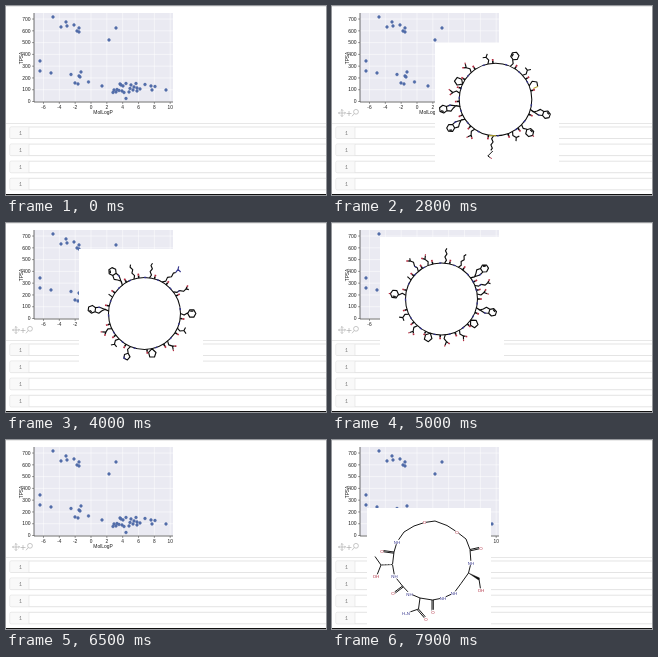
An HTML page for the animation above (8 s loop, 320x189 px).

```html
<!DOCTYPE html>
<html lang="en">
<head>
<meta charset="utf-8">
<title>Molecule scatter plot</title>
<style>
html, body { margin: 0; width: 100%; height: 100%; overflow: hidden; background: #fff; }
svg { display: block; width: 100vw; height: 100vh; font-family: "Liberation Sans", Arial, sans-serif; }
path { stroke-linejoin: round; }
</style>
</head>
<body>
<svg id="stage" viewBox="0 0 320 189"></svg>
<script>
const BLACK = '#0c0c0c', RED = '#b02c40', BLUE = '#34348c', GOLD = '#b8a830';
const stage = document.getElementById('stage');

const line = (d, color = BLACK, w = 0.95, fill = 'none') =>
  `<path d="${d}" stroke="${color}" stroke-width="${w}" fill="${fill}"/>`;
const rect = (x, y, w, h, fill, extra = '') =>
  `<rect x="${x}" y="${y}" width="${w}" height="${h}" fill="${fill}" ${extra}/>`;
const circle = (x, y, r, extra) => `<circle cx="${x}" cy="${y}" r="${r}" ${extra}/>`;
const text = (x, y, s, size, color = '#1c1c1c', anchor = 'middle', extra = '') =>
  `<text x="${x}" y="${y}" font-size="${size}" fill="${color}" text-anchor="${anchor}" ${extra}>${s}</text>`;
const group = (attr, body) => `<g ${attr}>${body}</g>`;

// ---- notebook page and plot ----
const xAt = v => 85 + v * 7.92;
const yAt = v => 95.5 - v * 0.1178;

const dots = [
  [47, 11], [60, 16], [68, 19], [55, 21], [61, 20], [73, 22], [71, 25], [73, 26], [110, 22], [103, 34],
  [34, 55], [34, 65], [45, 67], [65, 68.5], [75, 66], [73, 70], [74, 71], [69, 77], [72, 78], [82.5, 76],
  [96, 80], [107, 86.5], [108, 84], [110, 86], [111, 83.5], [114, 78], [115, 79], [113, 84.5], [117, 80],
  [116, 85], [118, 86.5], [120, 77.5], [120, 92.5], [123, 86], [124, 82.5], [125, 79], [127, 84],
  [128, 81], [130, 77.5], [131, 82], [131, 85], [134, 83], [139, 78.5], [145, 80], [146, 84], [149, 80.5], [160, 84]
];

function page() {
  let s = rect(0, 0, 320, 189, '#fff') + rect(0, 0, 320, 0.6, '#ddd');
  s += rect(28, 7, 139, 89, '#eaeaf2');
  for (let v = -6; v <= 10; v += 2) {
    const x = xAt(v);
    s += line(`M${x} 7V96`, '#fff', 0.5) + line(`M${x} 96v2`, '#444', 0.5) + text(x, 102.6, v, 4.8);
  }
  for (let v = 0; v <= 700; v += 100) {
    const y = yAt(v);
    s += line(`M28 ${y}H167`, '#fff', 0.5) + line(`M26 ${y}h2`, '#444', 0.5) + text(24.6, y + 1.7, v, 5, '#1c1c1c', 'end');
  }
  s += line('M28 7V96H167', '#333', 0.7);
  s += text(97, 107.9, 'MolLogP', 4.9);
  s += text(0, 0, 'TPSA', 4.8, '#1c1c1c', 'middle', 'transform="translate(16.7 52) rotate(-90)"');
  for (const [x, y] of dots)
    s += circle(x, y, 1.4, 'fill="#5470ac" stroke="#4a64a0" stroke-width=".4"');
  s += rect(0, 117.2, 320, 0.7, '#ddd');
  for (let i = 0; i < 4; i++) {
    const y = 121 + i * 17.1;
    s += rect(4, y, 330, 11.5, '#fff', 'rx="1" stroke="#d8d8d8" stroke-width=".7"');
    s += rect(4.4, y + 0.4, 18.6, 10.7, '#f9f9f9') + line(`M23 ${y}v11.5`, '#e0e0e0', 0.6);
    s += text(14.5, y + 7.7, '1', 5, '#777', 'middle', 'font-family="Liberation Mono, monospace"');
  }
  return s;
}

const toolbar = group('id="tools" opacity="0"',
  line('M6.5 107h7M10 103.5v7M8.8 104.7l1.2-1.2 1.2 1.2M8.8 109.3l1.2 1.2 1.2-1.2M7.7 105.8l-1.2 1.2 1.2 1.2' +
    'M12.3 105.8l1.2 1.2-1.2 1.2M14.5 107.5h5M17 105v5M26.4 105.8a2.4 2.4 0 1 0-4.8 0a2.4 2.4 0 1 0 4.8 0M22.2 107.5l-2.2 2.8',
    '#aaa', 0.65));

// ---- side chains, drawn outward along +x ----
const hex = x => `M${x} 0l1.7-3h3.4l1.7 3-1.7 3h-3.4zM${x + 2.1}-1.9h2.6M${x + 1}.5l1.1 1.8M${x + 5.8}.5l-1.1 1.8`;
const fork = 'M0 0L3 1.3L5.8-.4';
const oxygen = (x, y) => line(`M${x} ${y}l1.1-1.3`, BLACK, 1.1) + line(`M${x + 1.1} ${y - 1.3}l1-1.2`, RED, 1.3);
const chains = {
  ala: line('M0 0L4 .8'),
  leu: line(fork + 'L6-3.2M5.8-.4L8.4 1.2'),
  phe: line(fork + 'L6 0' + hex(6)),
  tyr: line(fork + 'L6 0' + hex(6)) + line('M12.8 0h1.4', RED),
  trp: line(fork + 'L8-2.4L11.2-1.4L11 2L7.7 2.6zM11.2-1.4L14.2-2.8L17 -.9L16.8 2.2L13.8 3.7L11 2M14-1.6l1.9 1.2') +
    line('M7.1 2L7.7 2.6L9 2.4', BLUE),
  lys: line('M0 0L2.6 1.3L5.2-.2L7.8 1.3L10.4-.2L12.4 .8'),
  arg: line('M0 0L3 1.4L6-.2L9 1.4L12 0L14 .8') + line('M14 .8L17 0L19-1.6M17 0L17.4 3', BLUE),
  acid: line(fork + 'L8.4 1') + oxygen(5.8, -0.4) + line('M8.4 1l1.2.6', RED),
  amide: line('M0 0L3 1.3L5.4.2M5.4.4L8.4 1.8L11 .4L13 1.6') + line('M3.8 1L5.4.4', BLUE) + oxygen(11, 0.4),
  pro: line('M0 0L3.8-2.6L7.2-.6L6.4 3.2L2.4 3.4z'),
  cys: line('M0 0L3.8-2.6L7.2-.6L6.4 3.2') + line('M6.4 3.2L2.4 3.4', GOLD),
  his: line(fork + 'L8-3L11.2-2L11 1.2L8 2L5.8-.4') + line('M11.1-.4L11 1.2L9.5 1.6', BLUE),
  tail: line('M0 0L4 2.5' + Array.from({ length: 13 }, (_, i) => `l3.9 ${i % 2 ? 2.1 : -1.7}`).join('')) +
    line('M4 2.5l-.6 3.2', RED)
};

// subs: [angle, chain, extra turn]; every chain brings its own amide bond on the ring
function ring(cx, cy, r, subs, k = 1.2) {
  let s = circle(cx, cy, r, `fill="none" stroke="${BLACK}" stroke-width="1.05"`);
  const carbonyl = line('M0 0h2', BLACK, 1.3) + line('M2 0h1.6', RED, 1.4);
  const nitrogen = line('M0-.9v1.8', BLUE, 1.1);
  const place = (a, scale, body, turn = 0) =>
    group(`transform="translate(${cx} ${cy}) rotate(${a}) translate(${r}) rotate(${turn}) scale(${scale})"`, body);
  for (const [a, type, turn] of subs)
    s += place(a, k, chains[type], turn) + place(a + 8, k, carbonyl) + place(a - 7, k, nitrogen);
  return s;
}

function labelled() {
  const atom = (x, y, s, c) => rect(x - s.length * 1.5, y - 2.2, s.length * 3, 4.4, '#fff') + text(x, y + 1.6, s, 4.4, c);
  let s = line('M92.5 82.5L103 81L115 85.5L125 92L134 99L138 109.5L139 123L136.5 133L129 143.5L122 153L111 158' +
    'L100.5 160L88 158L77.5 153.5L70.5 146L62.5 136L60.5 124.5L62 112L65 102L72 92L82 86z' +
    'M138 109.5l9-2M138.3 110.8l9-2M147 139l1.5 10M100 160v11M101.3 160v11M70.5 146l-8 6M71.3 147l-8 6' +
    'M62 112l-11-1.5M61.8 113.2l-11-1.5M60.5 124.5L49 125L45 135M49 125L43 116.5' +
    'M88 158L86.5 169L75 173M86.5 169l7 8M85.5 170l7 8');
  s += line('M136.5 133L147.6 138L146.6 140z', BLACK, 0.4, BLACK);
  s += line('M60.5 124.5L49 125', '#fff', 0.9).replace('/>', ' stroke-dasharray=".6 .9"/>');
  for (const [x, y] of [[92.5, 82.5], [125, 92], [149, 108], [50, 111], [61, 153.5], [101, 172], [94, 179]])
    s += atom(x, y, 'O', RED);
  s += atom(44, 136.5, 'OH', RED) + atom(149, 150.5, 'OH', RED) + atom(74, 173.5, 'H₂N', BLUE);
  for (const [x, y] of [[65, 102], [139, 123], [62.5, 136.5], [77.5, 154], [111, 158.5], [122, 153.5]])
    s += atom(x, y, 'NH', BLUE);
  return s;
}

// ---- hover cards: start, end, left, top, drawing ----
const cards = [
  [1800, 2300, 111, 27, ring(151, 87, 24.5, [
    [-75, 'tyr'], [-103, 'ala'], [-122, 'ala'], [-143, 'leu'], [-162, 'leu'], [188, 'phe'], [157, 'leu'], [137, 'leu'],
    [113, 'trp'], [67, 'trp'], [43, 'leu'], [21, 'leu'], [-18, 'tail', 29], [-38, 'leu'], [-54, 'ala']], 0.85)],
  [2800, 3200, 103, 37, ring(163.5, 93.5, 36.3, [
    [-102, 'leu'], [-66, 'phe'], [-132, 'acid'], [-155, 'pro'], [190, 'acid'], [169, 'trp'], [147, 'trp'], [125, 'acid'],
    [93, 'lys', 4], [62, 'leu'], [44, 'tyr'], [16, 'trp'], [-22, 'cys'], [-42, 'leu']]) +
    line('M157 129.6l7 .2', GOLD, 1.1) + line('M160.8 145l-5 5l2.4 1.6') + line('M158.2 151.6l1.6 1', RED)],
  [4000, 4500, 73, 26, ring(138.5, 90.5, 36, [
    [-128, 'trp'], [-107, 'lys'], [-82, 'lys'], [-61, 'arg', 23], [-37, 'amide', 22], [0, 'phe'], [24, 'leu'], [50, 'acid'],
    [78, 'pro'], [113, 'his'], [135, 'leu'], [155, 'acid'], [184, 'trp'], [207, 'ala']])],
  [5000, 5500, 48, 14, ring(109.5, 76, 36, [
    [-130, 'amide'], [-112, 'acid'], [-85, 'lys'], [-62, 'lys'], [-36, 'trp'], [-22, 'amide', 8], [-8, 'acid'], [14, 'trp'],
    [36, 'pro'], [60, 'acid'], [84, 'acid'], [108, 'pro'], [132, 'acid'], [155, 'leu'], [186, 'tyr'], [212, 'ala']])],
  [5900, 6500, 35, 61, ring(97, 121, 36, [
    [-115, 'leu'], [-75, 'acid'], [-35, 'leu'], [5, 'phe'], [45, 'acid'], [88, 'pro'], [130, 'leu'], [172, 'amide'], [208, 'ala']])],
  [7600, 8000, 35, 68, labelled()]
];

stage.innerHTML = page() + toolbar + cards.map(([, , x, y, body]) =>
  group('class="card" visibility="hidden"', rect(x, y, 124, 123, '#fff') + body)).join('') + rect(0, 188, 320, 1, '#111');

const tools = document.getElementById('tools');
const cardNodes = stage.querySelectorAll('.card');

function draw(now) {
  const t = now % 8000;
  tools.setAttribute('opacity', t < 1900 ? 0 : t < 2000 ? 0.5 : 1);
  cards.forEach(([from, to], i) =>
    cardNodes[i].setAttribute('visibility', t >= from && t < to ? 'visible' : 'hidden'));
}

const start = performance.now();
function tick() {
  draw(performance.now() - start);
  requestAnimationFrame(tick);
}
tick();
</script>
</body>
</html>
```
